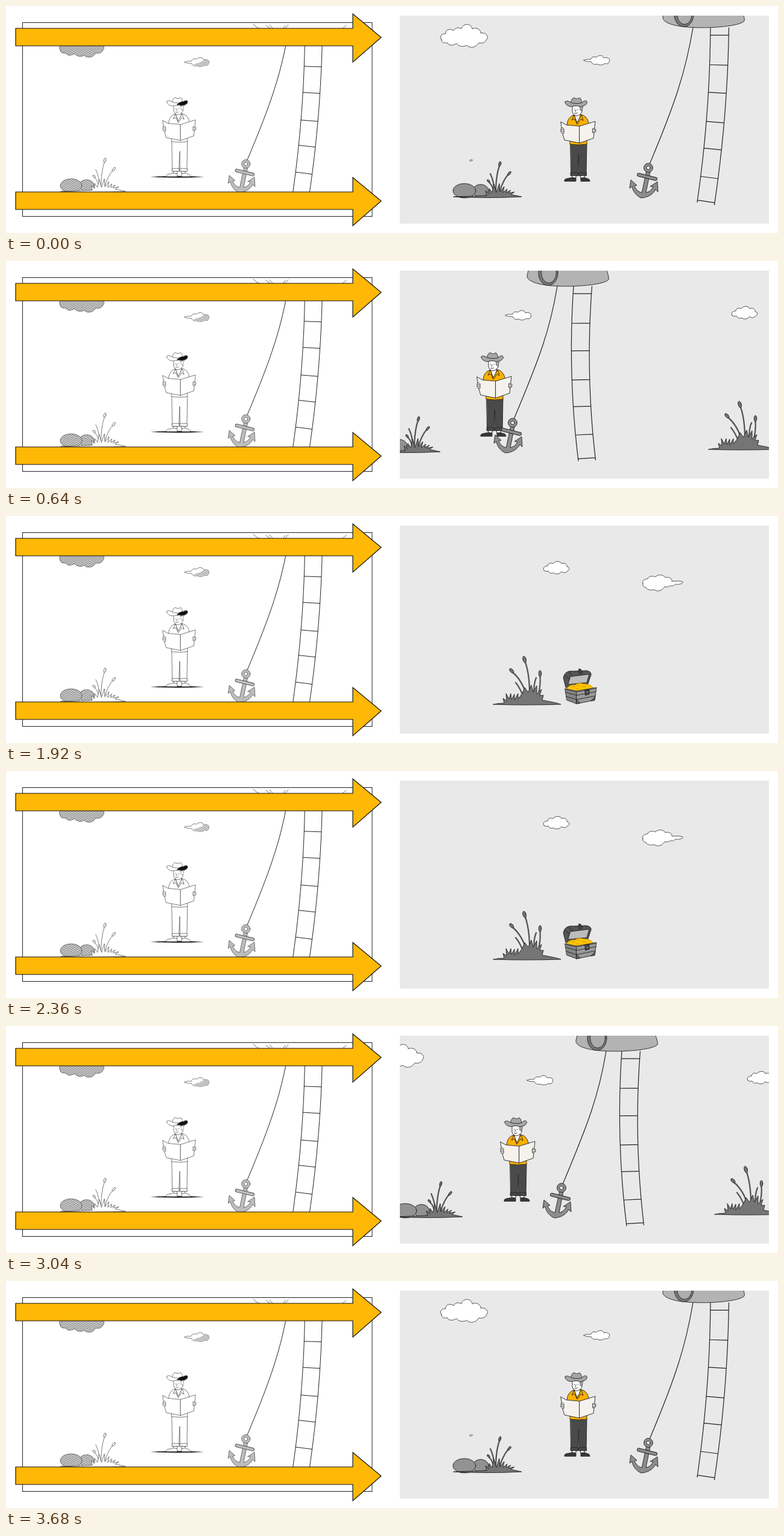
Animation of 1280 by 376 pixels, one loop 3720 ms. Source, as an HTML page:

```html
<!DOCTYPE html>
<html lang="en">
<head>
<meta charset="utf-8">
<title>Sketch to animation</title>
<style>
html, body { margin: 0; width: 100%; height: 100%; overflow: hidden; background: #fff; }
svg { display: block; width: 100%; height: 100%; }
.ink { stroke: var(--ink, #222); stroke-width: var(--line, .9); stroke-linejoin: round; stroke-linecap: round; }
.line { fill: none; }
.cloud { fill: var(--cloud, #fff); stroke-width: var(--line, .75); }
.hat { fill: var(--hat, #a6a6a6); }
.shirt { fill: var(--shirt, #ffb000); }
.paper { fill: var(--paper, #f5f2ee); }
.pants { fill: var(--pants, #4a4a4a); }
.shoes { fill: var(--shoes, #383838); }
.skin { fill: #fff; }
.rock { fill: var(--rock, #929292); }
.plant { fill: var(--plant, #757575); }
.stalk { fill: none; stroke: var(--stalk, #555); stroke-width: var(--stalk-w, 2.3); stroke-linecap: round; }
.anchor { fill: var(--iron, #8d8d8d); }
.sketch {
  --ink: #444; --line: .75; --hat: #fff; --shirt: #fff; --paper: #fff; --pants: #fff; --shoes: #fff;
  --rock: url(#hatch); --plant: #fff; --stalk: #666; --stalk-w: .9; --iron: #bdbdbd;
}
.arrow { fill: #ffb805; stroke: #111; stroke-width: 1.2; }
</style>
</head>
<body>
<svg viewBox="0 0 1280 376" preserveAspectRatio="none">
<defs>
  <clipPath id="panel"><rect x="653" y="16" width="612" height="344.5"/></clipPath>
  <clipPath id="page"><rect x="28" y="28" width="579" height="320"/></clipPath>
  <pattern id="hatch" width="3" height="3" patternUnits="userSpaceOnUse" patternTransform="rotate(58)">
    <rect width="3" height="3" fill="#d2d2d2"/><rect width="1.3" height="3" fill="#8c8c8c"/>
  </pattern>

  <path id="bigCloud" class="ink cloud" d="M722 56C717 48 726 45 729 46C728 38 738 37 742 41C745 34 754 36 755 38C757 28 772 28 773 38C780 34 788 40 787 45C796 43 801 51 797 55C795 62 787 62 784 61C779 70 768 70 764 65C757 69 749 66 747 62C741 66 734 66 732 61C726 62 722 60 722 56Z"/>
  <path id="wisp" class="ink cloud" d="M958 90C962 87 968 89 970 88C971 83 978 84 979 85C983 80 991 82 991 86C997 84 1003 88 1000 91C1001 95 996 97 993 95C989 99 982 98 980 96C975 98 971 95 970 92C966 92 961 92 958 90Z"/>

  <g id="man" class="ink">
    <path class="pants" d="M936 228H963L962 281H950L949.500 246 948 281H937Z"/>
    <path class="pants" d="M936.500 276H948.500V281H936.500ZM950 276H962.500V281H950Z"/>
    <path class="skin" d="M939 281H945V285H939ZM953 281H959V285H953Z"/>
    <path class="shoes" d="M926 290C925 285 932 286 939 284L945 285V290ZM953 290V285L959 284C962 286 968 285 968 290Z"/>
    <path class="shirt" d="M941 181L954 180C962 182 965 188 967 197L963 205V229Q949 231 935 229V204L930 197C931 189 934 183 941 181Z"/>
    <path class="skin" d="M942 179L943 183 947 195 952 183V177Z"/>
    <path class="shirt" d="M942 181L938 189 943 187 947 196 953 187 957 190 954 180 947 193Z"/>
    <path class="skin" d="M939 165L939 175C941 183 948 183 951 180L955 176V165Z"/>
    <path class="hat" stroke-width=".5" d="M951 164L952 173 955 174 957 165Z"/>
    <path class="line" d="M942.500 171v.8M948 171v.8M945 172l-1 3M942.500 177.500q3 1.500 5-.5"/>
    <path class="hat" d="M936 162C937 156 939 152 942 152C945 154 948 154 951 152C954 153 954 158 955 162Z"/>
    <path class="hat" d="M927 159C928 156 932 157 937 160C943 162 951 162 955 160C958 157 961 156 963 158C965 163 958 166 952 167C944 163 938 168 934 166C930 165 927 162 927 159Z"/>
    <path class="paper" d="M920 192L929 197 951 199V227L926 222 923 212Z"/>
    <path class="paper" d="M951 199L977 191 974 219 951 227Z"/>
    <path class="skin" d="M921 202q4-1 4 3v6q-4 1-5-3ZM973 203q5-1 5 3-1 5-5 4Z"/>
    <path class="line" d="M921 205h3M921 208h3M974 205h3M974 208h3"/>
  </g>

  <g id="rocks" class="ink">
    <ellipse class="rock" cx="787" cy="306" rx="13" ry="10.500"/>
    <ellipse class="rock" cx="760" cy="306" rx="19" ry="12"/>
  </g>
  <g id="grass">
    <path class="stalk" d="M812 312Q812 282 818 265M817 312Q824 288 833 279M809 312Q808 298 801 292M810 308Q809 290 803 278"/>
    <path class="ink plant" d="M742 316L797 314l-2-8 6 5 0-9 5 7 3-14 4 14 5-15 1 14 7-9-2 10 7-6-2 6 8-4-4 5 10-2-6 4 18 4Q800 319 742 316Z"/>
    <g class="ink plant">
      <ellipse cx="819" cy="261.500" rx="1.800" ry="4" transform="rotate(16 819 261)"/>
      <ellipse cx="834.500" cy="277" rx="1.700" ry="4" transform="rotate(40 834 277)"/>
      <ellipse cx="800" cy="290" rx="1.600" ry="3" transform="rotate(-40 800 290)"/>
    </g>
  </g>
  <g id="reeds">
    <path class="stalk" d="M868 302Q869 265 861 242M864 300Q856 272 840 259M880 302Q887 285 885.500 266M858 300Q852 284 845 276M876 298Q874 280 879 268"/>
    <path class="ink plant" d="M808 312Q816 310 826 310l-2-8 6 4-1-12 5 9 3-9 1 10 5-9 0 10 6-11 0 9 7-9 4-10 6 8 5-12 3 12 6-11 0 14 8-8-3 10 6 0-2 8Q912 309 920 312Q860 314 808 312Z"/>
    <g class="ink plant">
      <ellipse cx="859.500" cy="237.500" rx="2.600" ry="5.500" transform="rotate(-14 860 237)"/>
      <ellipse cx="838" cy="256.500" rx="2.400" ry="4.500" transform="rotate(-42 838 256)"/>
      <ellipse cx="885.500" cy="261" rx="2.200" ry="5"/>
    </g>
  </g>

  <g id="anchor" class="ink">
    <path class="anchor" d="M1062 274L1068 275 1061 309C1067 308 1071 304 1073 299L1068 299 1080 291 1081 308 1077 304C1072 313 1064 317 1053 318C1044 314 1039 306 1038 299L1034 302 1036 288 1046 297 1042 298C1045 305 1049 308 1054 309Z"/>
    <path class="line" d="M1049 279.500L1077 286.500" style="stroke-width:6"/>
    <path class="line" d="M1049 279.500L1077 286.500" style="stroke:var(--iron,#8d8d8d);stroke-width:4.300"/>
    <circle class="anchor" cx="1065" cy="268" r="7.500"/>
    <circle class="skin" cx="1065" cy="268" r="3"/>
  </g>
  <path id="hull" class="ink" fill="#b3b3b3" d="M1096-10L1089 18C1088 27 1105 33 1130 35C1170 38 1217 33 1224 25C1226 20 1219 6 1214-10Z"/>

  <g id="chest" class="ink">
    <path fill="#555" d="M928 284L924 268C926 259 932 256 940 257L962 256C969 257 972 261 969 266L965 278 932 283Z"/>
    <path fill="#bcbcbc" d="M936 266L967 262 963 276 932 279Z"/>
    <path fill="#444" d="M949 257l1-4 3 1 3 5-4 3Z"/>
    <path class="line" d="M933 258l6 7M927 264l7 6"/>
    <path fill="#ffc400" stroke="#b98500" d="M929 286Q936 278 943 280Q950 275 957 278Q967 277 974 285L947 292Z"/>
    <path class="line" style="stroke:#c99000" d="M938 283q3-2 5 0M947 281q3-2 5 1M956 283q3-2 5 0M945 287q3-2 5 0"/>
    <path fill="#858585" d="M927 286L946 290 946 311 930 305Z"/>
    <path fill="#9a9a9a" d="M946 290L979 284 976 305 946 311Z"/>
    <path class="line" d="M928 292l18 5 32-6M929 299l17 5 31-6"/>
    <path class="line" style="stroke:#555;stroke-width:2.200" d="M928 287l18 4 32-6"/>
    <path fill="#666" d="M970 306l7-7-1 6ZM946 304l6 6-6 1Z"/>
    <path fill="#444" d="M960 288l7-1v8l-6 2Z"/>
    <path class="line" style="stroke:#ddd" d="M964 291v2"/>
  </g>
</defs>

<rect x="27.500" y="27.500" width="579.500" height="321" fill="#fff" stroke="#222"/>
<g class="sketch" clip-path="url(#page)">
  <path d="M239 283Q285 280 329 283Q285 286 239 283Z" fill="#222"/>
  <g transform="matrix(.95 0 0 .947 -614 7.800)">
    <use href="#bigCloud" x="19" y="13" style="--cloud:url(#hatch)"/>
    <use href="#wisp"/>
    <path d="M972 94Q985 92 994 84Q1003 87 1000 91Q1000 96 993 95Q986 99 972 94Z" fill="url(#hatch)" opacity=".8"/>
    <use href="#man"/>
    <path d="M944 165Q950 158 956 159Q960 156 963 158Q965 164 952 166Q948 164 944 165Z" fill="#111"/>
    <use href="#rocks"/><use href="#grass"/>
    <path id="sketchRig" class="ink line" style="--line:1.050;--ink:#222"/>
    <use href="#anchor"/>
  </g>
  <path class="ink line" d="M410 30q4 5 12 8M431 32l8 6M437 31l6 7M463 32l-4 6M468 31l-6 7M564 32l-6 5"/>
</g>
<path class="arrow" d="M16 37H575V13L622 52 575 93V66H16Z"/>
<path class="arrow" d="M16 308H575V284L622 323 575 364V337H16Z"/>

<rect x="653" y="16" width="612" height="344.500" fill="#e9e9e9"/>
<g clip-path="url(#panel)">
  <use href="#bigCloud" data-layer="bigCloud"/>
  <use href="#wisp" data-layer="wisp"/>
  <path data-layer="puff" class="ink cloud" d="M892 90C889 86 894 82 898 83C898 78 904 77 907 79C910 74 920 74 921 79C927 76 931 81 930 84C935 84 935 90 931 91C928 95 923 94 921 92C918 97 910 97 908 94C904 96 900 94 899 91C896 92 893 92 892 90Z"/>
  <path data-layer="farCloud" class="ink cloud" d="M1056 112C1053 106 1062 104 1064 104C1065 99 1074 99 1077 101C1081 95 1092 98 1093 102C1099 100 1105 104 1104 108C1110 108 1118 107 1122 109C1123 112 1116 114 1110 113C1106 116 1104 117 1102 115C1098 118 1094 118 1092 117C1088 124 1080 126 1075 122C1068 124 1061 121 1061 118C1057 118 1055 115 1056 112Z"/>
  <g data-layer="shore">
    <use href="#rocks"/><use href="#grass"/>
    <g id="fly" class="ink" style="--line:.6;--ink:#555" fill="#ddd">
      <ellipse cx="770" cy="256" rx="1.500" ry="1.200"/><ellipse id="wing" cx="773" cy="255.500" rx="1.500" ry="1.400"/>
    </g>
  </g>
  <use href="#reeds" data-layer="reeds"/>
  <use href="#chest" data-layer="chest"/>
  <use href="#man" data-layer="man"/>
  <g data-layer="ship">
    <path id="rig" class="ink line" style="--line:1.200"/>
    <use href="#anchor"/>
    <g id="airship">
      <use href="#hull"/>
      <ellipse class="ink" cx="1124" cy="14" rx="16" ry="20.500" fill="#777"/>
      <ellipse class="ink" cx="1125" cy="13" rx="12.500" ry="17.500" fill="#adadad"/>
    </g>
  </g>
</g>
</svg>
<script>
const LOOP = 3720, STEP = 40;
const times = [0, 640, 1120, 2360, 2840, 3040, 3680];

// Horizontal offset of each parallax layer at the key times
const layers = {
  bigCloud: [0, -152, -430, -430, -272, -106, 0],
  wisp:     [0, -130, -400, -400, -248, -94, 0],
  shore:    [0, -135, -420, -420, -262, -98, 0],
  man:      [0, -139, -424, -424, -265, -100, 0],
  ship:     [0, -225, -620, -620, -408, -144, 0],
  reeds:    [475, 357, 2, 0, 170, 367, 475],
  chest:    [475, 357, 0, 0, 168, 366, 475],
  puff:     [450, 312, 3, 0, 154, 338, 450],
  farCloud: [500, 380, 7, 0, 171, 380, 500]
};
const sway = {
  lift: [0, 6, 5, 4, 4, 6, 0],
  top:  [0, -2, 0, 0, -2, -3, 0],
  mid:  [-6, -3, -4, -4, -4, -3, -6],
  end:  [-22, 8, -3, -3, -3, 8, -22]
};
const rungs = [.042, .212, .37, .537, .69, .852, .988];

const $ = id => document.getElementById(id);
const moving = [...document.querySelectorAll('[data-layer]')];

function ease(t, start, middle, end, power) {
  if (t <= start) return 0;
  if (t >= end) return 1;
  return t < middle
    ? .5 * ((t - start) / (middle - start)) ** power
    : 1 - .5 * ((end - t) / (end - middle)) ** power;
}

const pan = t => t < 1800 ? ease(t, 20, 720, 1240, 3) : 1 - ease(t, 2340, 2915, 3440, 2.6);
const linear = t => t;

function sample(keys, t, warp) {
  let i = 0;
  while (i < times.length - 2 && t >= times[i + 1]) i++;
  const a = warp(times[i]), b = warp(times[i + 1]);
  const k = Math.min(1, (warp(t) - a) / (b - a));
  return keys[i] + (keys[i + 1] - keys[i]) * k;
}

// Rope and ladder hanging from the airship
function rigging({ lift, top, mid, end }) {
  const y0 = 36 + lift;
  const rail = (v, right) => {
    const x = 1168 + top + v * (4 * mid - end + (2 * end - 4 * mid) * v);
    const y = y0 + 289 * v;
    return right ? [x + 30.5 - 2 * v, y - end * .2 * v] : [x, y];
  };
  const side = right => 'M' + Array.from({ length: 13 }, (_, i) => rail(i / 12, right)).join('L');
  const steps = rungs.map(v => `M${rail(v, false)}L${rail(v, true)}`).join('');
  return `M1139 ${y0}C1127 ${y0 + 72} 1110 160 1067 262${side(false)}${side(true)}${steps}`;
}

function draw(t) {
  for (const el of moving) {
    el.setAttribute('transform', `translate(${sample(layers[el.dataset.layer], t, pan).toFixed(2)} 0)`);
  }
  const pose = {};
  for (const name in sway) pose[name] = sample(sway[name], t, linear);
  $('rig').setAttribute('d', rigging(pose));
  $('airship').setAttribute('transform', `translate(0 ${pose.lift})`);
  $('fly').style.display = t < 240 || t > 3360 ? '' : 'none';
  $('wing').setAttribute('cx', t % 80 ? 773 : 772);
}

$('sketchRig').setAttribute('d', rigging({ lift: 0, top: 0, mid: -6, end: -22 }));

const begin = performance.now();
function frame() {
  const t = (performance.now() - begin) % LOOP;
  draw(Math.floor(t / STEP) * STEP);
  requestAnimationFrame(frame);
}
draw(0);
requestAnimationFrame(frame);
</script>
</body>
</html>
```
